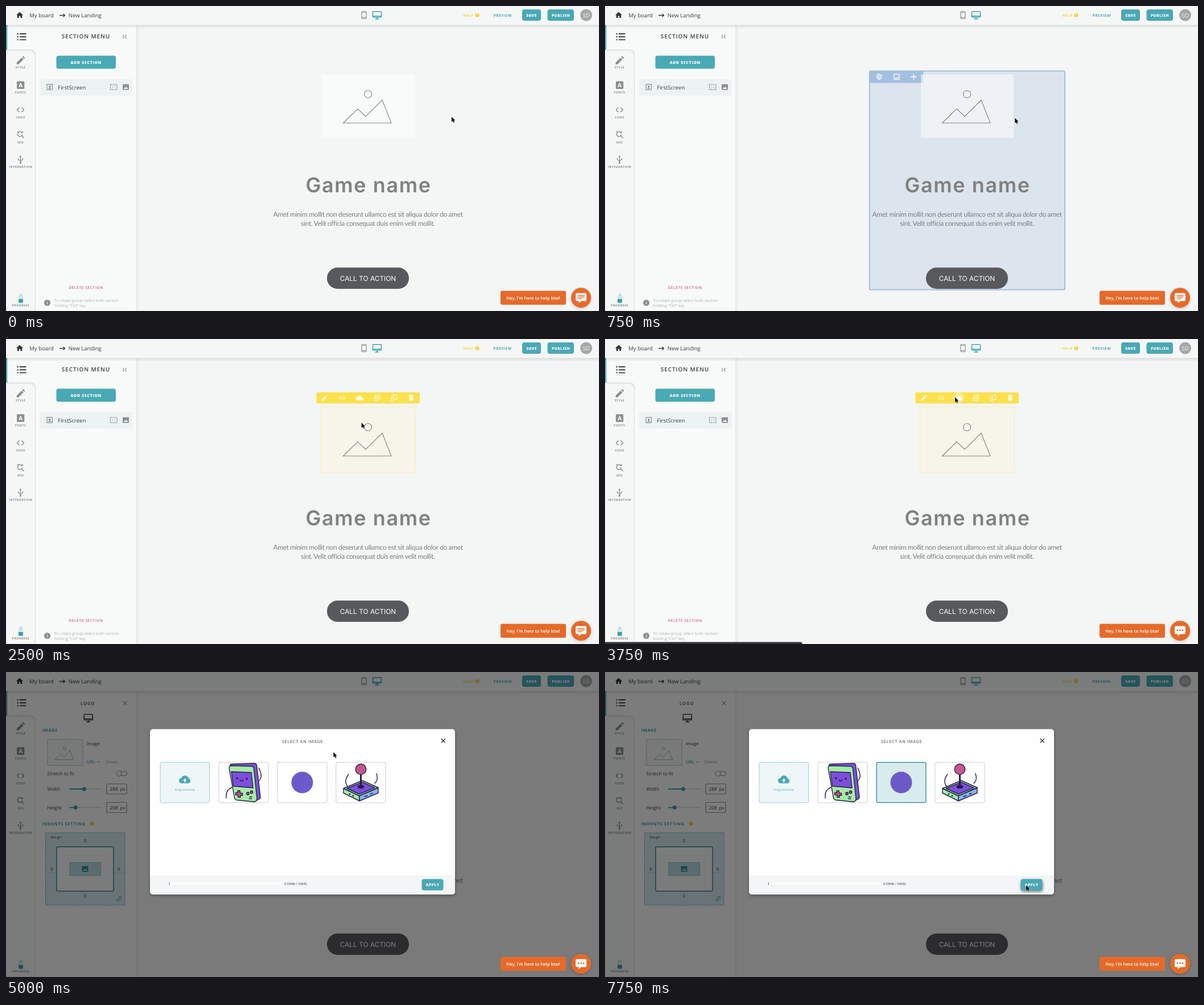
An HTML page for the animation above (8 s loop, 1042 by 537 pixels).

```html
<!DOCTYPE html>
<html lang="en">
<head>
<meta charset="utf-8">
<title>Landing editor</title>
<style>
html, body { margin: 0; width: 100%; height: 100%; overflow: hidden; background: #f4f5f5; }
svg { display: block; }
text { font-family: "Open Sans", sans-serif; font-size: 8px; fill: #3b3e40; text-rendering: geometricPrecision; }
.mid { text-anchor: middle; }
.bold { font-weight: 700; }
.semi { font-weight: 600; }
.white { fill: #fff; }
.teal { fill: #49a9b5; }
.crumb { font-size: 9.6px; font-weight: 500; }
.btn { font-size: 6.6px; font-weight: 800; letter-spacing: .5px; fill: #fff; text-anchor: middle; }
.rail { font-size: 5.4px; font-weight: 700; letter-spacing: .4px; fill: #8b8f90; text-anchor: middle; }
.head { font-size: 7.3px; font-weight: 700; letter-spacing: .8px; fill: #3d9aa6; }
.hint { font-size: 7px; fill: #aeb2b4; }
.field { font-size: 8.3px; }
.para { font: 12px Lato, sans-serif; letter-spacing: -.37px; fill: #7d7f80; text-anchor: middle; }
.line { fill: none; stroke: #8b8f90; stroke-width: 1.2; }
.ink { stroke: #241d46; stroke-width: 1.4; stroke-linejoin: round; stroke-linecap: round; }
.none { fill: none; }
.dash { stroke-width: .9; stroke-dasharray: 2 1.4; }

/* One tick is 250 ms, 3.125% of the loop */
.anim { animation: 8s step-end infinite; }
#hoverSection { animation-name: hoverSection; }
#tile { animation-name: tile; }
#tools { animation-name: tools; }
#toolHover { animation-name: toolHover; }
#status { animation-name: status; }
.before { animation-name: hide; }
.after { animation-name: show; }
#chatLines { animation-name: chatLines; }
#chatDots { animation-name: chatDots; }
#thumbHover { animation-name: thumbHover; }
#thumbPicked { animation-name: thumbPicked; }
#applyHover { animation-name: applyHover; }
#cursor { animation: cursor 8s step-end infinite; }

@keyframes hoverSection {
  0% { opacity: 0 } 3.125% { opacity: .5 } 6.25% { opacity: 1 }
  9.375% { opacity: .4 } 12.5%, 100% { opacity: 0 }
}
@keyframes tile { 0% { opacity: 1 } 12.5%, 100% { opacity: 0 } }
@keyframes tools {
  0% { opacity: 0 } 28.125% { opacity: .5 } 31.25% { opacity: 1 } 50%, 100% { opacity: 0 }
}
@keyframes toolHover { 0% { opacity: 0 } 40.625%, 100% { opacity: 1 } }
@keyframes status { 0% { opacity: 0 } 43.75% { opacity: 1 } 53.125%, 100% { opacity: 0 } }
@keyframes hide { 0% { opacity: 1 } 50%, 100% { opacity: 0 } }
@keyframes show { 0% { opacity: 0 } 50%, 100% { opacity: 1 } }
@keyframes chatLines { 0% { opacity: 1 } 37.5%, 100% { opacity: 0 } }
@keyframes chatDots { 0% { opacity: 0 } 37.5%, 100% { opacity: 1 } }
@keyframes thumbHover {
  0% { opacity: 0 } 65.625% { opacity: .5 } 68.75% { opacity: 1 } 84.375%, 100% { opacity: 0 }
}
@keyframes thumbPicked { 0% { opacity: 0 } 84.375%, 100% { opacity: 1 } }
@keyframes applyHover { 0% { opacity: 0 } 96.875%, 100% { opacity: 1 } }
@keyframes cursor {
  0% { transform: translate(783px, 195px) }
  6.25% { transform: translate(783px, 195px); animation-timing-function: steps(2) }
  12.5% { transform: translate(657.5px, 199.5px); animation-timing-function: steps(2) }
  18.75% { transform: translate(631px, 177px) }
  25% { transform: translate(631px, 177px); animation-timing-function: steps(5) }
  40.625% { transform: translate(615px, 102.5px) }
  56.25% { transform: translate(615px, 102.5px); animation-timing-function: steps(5) }
  71.875% { transform: translate(516px, 199px) }
  75% { transform: translate(514px, 195px) }
  81.25% { transform: translate(514px, 195px); animation-timing-function: steps(2) }
  87.5% { transform: translate(675px, 304px); animation-timing-function: steps(3) }
  96.875%, 100% { transform: translate(740px, 375.5px) }
}
</style>
</head>
<body>
<svg width="1042" height="537" viewBox="0 0 1042 537">
  <defs>
    <linearGradient id="fall" x2="0" y2="1">
      <stop stop-color="#000" stop-opacity=".12"/><stop offset="1" stop-color="#000" stop-opacity="0"/>
    </linearGradient>
    <linearGradient id="side">
      <stop stop-color="#000" stop-opacity=".06"/><stop offset="1" stop-color="#000" stop-opacity="0"/>
    </linearGradient>
    <filter id="soft" x="-30%" y="-50%" width="160%" height="220%"><feGaussianBlur stdDeviation="2.5"/></filter>
    <path id="peaks" d="M592.500 206 618 181 632 194.500 661 165.500 677 206Z"/>
    <path id="pencil" d="M-6.500 6.500v-3.200L2.200-5.400l3.200 3.200L-3.300 6.500ZM3.200-6.400l1.100-1.100q.8-.6 1.500 0l1.700 1.700q.6.7 0 1.500L6.400-3.200Z"/>
    <path id="photo" fill-rule="evenodd" d="M-4.500-5h9q1 0 1 1v8q0 1-1 1h-9q-1 0-1-1v-8q0-1 1-1ZM-4 3.300h8L1.200-.8-.8 1.800-2 .4Z"/>
    <g id="screen" fill="none" stroke-width="1.6">
      <rect x="-7.500" y="-6.500" width="15" height="10" rx="1"/><path d="M-7.500 1.500h15M0 4v2.500M-3.500 6.700h7"/>
    </g>
    <g id="link" fill="none" stroke-width="1.100">
      <path d="M-1-2.300h-1.700a2.300 2.300 0 0 0 0 4.600H-1M1-2.300h1.700a2.300 2.300 0 0 1 0 4.600H1M-2 0h4"/>
    </g>
  </defs>

  <rect width="1042" height="537" fill="#f4f5f5"/>

  <!-- Canvas -->
  <g id="hoverSection" class="anim">
    <rect x="465" y="114.500" width="343" height="385" rx="1.500" fill="#2f70bf" fill-opacity=".3" stroke="#2c6dbd" stroke-width="2"/>
    <path d="M464 114h95v21.500h-95Z" fill="#2f70bf"/>
    <g fill="none" stroke="#fff" stroke-width="1.300">
      <path d="M480.800 119.800h2l.5 1.500 1.500-.3 1.300 1.900-1 1.500 1 1.500-1.300 1.900-1.500-.3-.5 1.500h-2l-.5-1.500-1.500.3-1.300-1.900 1-1.500-1-1.500 1.300-1.900 1.500.3Z"/>
      <circle cx="481.800" cy="124.500" r="1.600"/>
      <rect x="507.500" y="120" width="9.500" height="9.500" rx="1"/>
      <path d="m509 127.500 2-2.500 1.500 1.500 1.500-2 2 3Z" fill="#fff" stroke="none"/>
      <path d="M537.500 124.700h10M542.500 119.700v10" stroke-width="1.700"/>
    </g>
  </g>
  <rect id="tile" class="anim" x="555" y="121" width="163" height="111" fill="#fff" fill-opacity=".52"/>
  <g id="tools" class="anim">
    <rect x="553.500" y="119.500" width="165.500" height="115.500" fill="#fbf6d8" fill-opacity=".35" stroke="#f8f2c4" stroke-width="1.600"/>
    <rect x="545.500" y="94" width="181.500" height="19.500" rx="1.500" fill="#fbe14b"/>
    <circle id="toolHover" class="anim" cx="621.500" cy="103.500" r="9.500" fill="#fff" fill-opacity=".35"/>
    <g fill="#fffbe4" stroke="none">
      <use href="#pencil" transform="translate(560 104) scale(.78)"/>
      <path d="M617.500 108a3 3 0 0 1 0-6 4 4 0 0 1 7.500 1 2.500 2.500 0 0 1 .5 5Z"/>
      <path d="M708.500 100.800h7v7q0 1.200-1.200 1.200h-4.600q-1.200 0-1.200-1.200ZM707.500 98.500h2.500l.7-.8h2.600l.7.8h2.500v1.400h-9Z"/>
    </g>
    <g fill="none" stroke="#fffbe4" stroke-width="1.200">
      <use href="#link" transform="translate(590.500 103.500)"/>
      <path d="M649.500 98.500h7v7h-7ZM647 101v7.500h7.500M653 100.300v3.400M651.300 102h3.400"/>
      <path d="M680.500 98.500h6v8h-6ZM677.500 101v8h6"/>
    </g>
  </g>
  <g fill="none" stroke="#818384" stroke-width="1.100">
    <use href="#peaks"/><circle cx="636.200" cy="155.300" r="6.500"/>
  </g>
  <text x="637" y="328" class="mid" style="font:600 36px Inter,sans-serif;letter-spacing:1.600px;fill:#808182">Game name</text>
  <text x="636" y="371.300" class="para">Amet minim mollit non deserunt ullamco est sit aliqua dolor do amet</text>
  <text x="636" y="386.800" class="para">sint. Velit officia consequat duis enim velit mollit.</text>
  <rect x="564" y="460.500" width="144" height="37.500" rx="18.500" fill="#58595d"/>
  <text x="636" y="483.500" class="mid white" style="font:11.900px Inter,sans-serif;fill:#fff">CALL TO ACTION</text>

  <!-- Side panel -->
  <rect x="229" y="33" width="5" height="504" fill="url(#side)"/>
  <rect y="33" width="229" height="504" fill="#f8f9f9"/>
  <path d="M0 77h43q8.500 0 8.500 8.500V537H0Z" fill="#f5f7f7" stroke="#d9dcdd"/>
  <path d="M0 77h43q8.500 0 8.500 8.500V90q-2-11-10-11H0Z" fill="#e3e6e6"/>
  <path d="M0 33h2.300v44H0Z" class="teal"/>
  <path d="M19.500 49h2.500M19.500 54.200h2.500M19.500 59.400h2.500M24 49h11.500M24 54.200h11.500M24 59.400h11.500" stroke="#3b3e40" stroke-width="1.900"/>

  <g fill="#8b8f90">
    <use href="#pencil" transform="translate(25.300 96.300)"/>
    <rect x="19" y="132.500" width="13.300" height="13.500" rx="1.500"/>
    <path d="m25.300 270.800 0-5.300M25.300 263l2 3h-4Z"/>
  </g>
  <text x="25.600" y="143" class="mid bold white" style="font-size:10px">A</text>
  <path class="line" style="stroke-width:1.500" d="m23.500 178.500-4 4.300 4 4.300M27.500 178.500l4 4.300-4 4.300"/>
  <path class="line" style="stroke-width:1.500" d="M27.500 222.500a4.200 4.200 0 1 0 1.200 3.500M27.500 228.500l4.300 4.200M21 222v-2M29 220.500v2.500h-2.500"/>
  <path class="line" style="stroke-width:1.300" d="M25.500 265v11M21.500 268v2.500l4 2.500 4-2.500v-2.500"/>
  <circle cx="25.500" cy="276" r="1.700" fill="#8b8f90"/>
  <rect x="22" y="509" width="8" height="13.500" rx="1" fill="#cfe6e9"/><path d="M24 506.500h4v3h-4Z" fill="#b9dbe0"/>
  <path d="M22 516h8v5.500q0 1-1 1h-6q-1 0-1-1Z" fill="#3a9fac"/>
  <g>
    <text x="25.500" y="110" class="rail">STYLE</text>
    <text x="25.500" y="154" class="rail">FONTS</text>
    <text x="25.500" y="198" class="rail">CODE</text>
    <text x="25.500" y="241.500" class="rail">SEO</text>
    <text x="25.700" y="285" class="rail">INTEGRATION</text>
    <text x="25.800" y="529" class="rail">PROGRESS</text>
  </g>

  <g class="anim before">
    <text x="140.500" y="57" class="mid semi" style="font-size:10px;letter-spacing:.9px">SECTION MENU</text>
    <path class="line" d="M206 50.500v7M212 50.800l-3.200 3.300 3.200 3.300"/>
    <rect x="88.500" y="87.500" width="104.500" height="23" rx="4" class="teal"/>
    <text x="140.800" y="101.500" class="btn" style="font-size:6.900px;letter-spacing:.7px">ADD SECTION</text>
    <rect x="60" y="129" width="162" height="28.500" fill="#edf2f3"/>
    <rect x="72" y="138" width="9.500" height="9.500" class="line"/>
    <path d="M74.300 145.500q0-1.800 2.500-1.800t2.500 1.800Z" fill="#6d7172"/><circle cx="76.800" cy="141.700" r="1.400" fill="#6d7172"/>
    <text x="91.300" y="146.500" style="font-size:9.500px">FirstScreen</text>
    <rect x="183.500" y="138" width="11.500" height="9.500" class="line" stroke-dasharray="3 1"/>
    <path class="line" style="stroke-width:.8" d="m186 140 2 1.800m2.500 0 2-1.800m-6.500 5.500 2-1.800m2.500 0 2 1.800"/>
    <use href="#photo" x="210.500" y="142.700" fill="#8b8f90"/>
    <text x="140.700" y="497.500" class="mid semi" style="font-size:6.300px;letter-spacing:.75px;fill:#cc5c7b">DELETE SECTION</text>
    <circle cx="72.500" cy="522.500" r="5.500" fill="#8b8f90"/>
    <path d="M72.500 522v3.200M72.500 519.300v1.300" stroke="#fff" stroke-width="1.200"/>
    <text x="84.500" y="520.500" class="hint">To create group select both section</text>
    <text x="84.500" y="529.500" class="hint">holding “Ctrl” key</text>
  </g>

  <g class="anim after">
    <text x="143.800" y="58" class="mid semi" style="font-size:7.600px;letter-spacing:1px">LOGO</text>
    <path class="line" d="m205.500 51.300 7 7m0-7-7 7"/>
    <use href="#screen" x="144.700" y="81" stroke="#3b3e40"/>
    <text x="63.500" y="105.200" class="head">IMAGE</text>
    <rect x="73" y="119" width="62" height="45.500" class="dash" fill="#f1f3f3" stroke="#8b8f90"/>
    <g class="line" style="stroke-width:2" transform="translate(-142 61.500) scale(.385)"><use href="#peaks" y="35"/><circle cx="636" cy="190" r="6.500"/></g>
    <text x="142" y="129" style="font-size:8px">Image</text>
    <text x="142" y="161" class="semi" style="font-size:7.600px;fill:#3d9aa6">URL</text>
    <path d="m160.500 157.300 2 2 2-2" fill="none" stroke="#3d9aa6"/>
    <text x="174" y="161" style="font-size:7.600px;fill:#999d9e">Delete</text>
    <text x="72.500" y="181.500" class="field">Stretch to fit</text>
    <rect x="195" y="175" width="17.500" height="7.500" rx="3.700" class="line"/>
    <circle cx="198.500" cy="178.700" r="4.700" fill="#f8f9f9" stroke="#8b8f90"/>
    <text x="72.500" y="209" class="field">Width</text>
    <text x="72.500" y="241.500" class="field">Height</text>
    <path d="M111 206h57M111 238.600h57" stroke="#d0d4d5" stroke-width="1.500"/>
    <path d="M111 206h26M111 238.600h11" stroke="#3d9aa6" stroke-width="1.800"/>
    <circle cx="137.300" cy="206" r="3.600" fill="#3d9aa6"/><circle cx="122.300" cy="238.600" r="3.600" fill="#3d9aa6"/>
    <rect x="177" y="197" width="35" height="18" rx="1.500" class="line"/><rect x="177" y="229.500" width="35" height="18" rx="1.500" class="line"/>
    <text x="182.500" y="209" class="field">288</text><text x="200.500" y="209">px</text>
    <text x="182.500" y="241.500" class="field">208</text><text x="200.500" y="241.500">px</text>
    <text x="63.500" y="269.500" class="head">INDENTS SETTING</text>
    <circle cx="151.300" cy="266.700" r="3.500" fill="#f0c62e"/><path d="M151.300 266.300v2.300M151.300 264.600v.9" stroke="#fff" stroke-width=".9"/>
    <rect x="69.500" y="283" width="139.500" height="127.500" class="dash" fill="#d3e7ea" stroke="#3d9aa6"/>
    <path d="M69.500 353.500h19M189.500 353.500h19.500" class="dash" stroke="#9cc9d0"/>
    <rect x="89" y="307.700" width="100" height="78" rx="2" fill="#f4f7f7" stroke="#3e7f92" stroke-width="1.500"/>
    <rect x="112" y="335.300" width="54.500" height="23" class="dash" fill="#b7d9de" stroke="#3d9aa6"/>
    <use href="#photo" x="139" y="346.800" fill="#32869a"/>
    <text x="78.500" y="292.500" style="font-size:5.900px">Margin</text>
    <text x="139" y="300" class="mid">0</text><text x="139" y="396.500" class="mid">0</text>
    <text x="80.500" y="349.700" class="mid">0</text><text x="198" y="349.700" class="mid">0</text>
    <use href="#link" transform="translate(198.700 399.300) rotate(-45) scale(.9)" stroke="#3d9aa6"/>
  </g>

  <!-- Top bar -->
  <rect y="33" width="1042" height="6" fill="url(#fall)"/>
  <rect width="1042" height="33.500" fill="#f5f7f7"/>
  <path d="M24 10.500 18 16h1.800v5h3v-3.500h2.500V21h3v-5H30Z" fill="#333637"/>
  <text x="41.200" y="19.500" class="crumb">My board</text>
  <path d="M94 16.500h9M100.500 13.700l3 2.800-3 2.800" fill="none" stroke="#333637" stroke-width="1.300"/>
  <text x="109.800" y="19.500" class="crumb">New Landing</text>
  <rect x="625" y="9.500" width="8" height="13" rx="1.300" class="line"/><path d="M625 11.500h8M625 20.300h8" class="line"/>
  <use href="#screen" x="652" y="16.300" stroke="#3fa7b4"/>
  <text x="803.500" y="18.600" class="bold" style="font-size:6.400px;letter-spacing:.5px;fill:#f3d33f">HELP</text>
  <circle cx="828" cy="16" r="3.600" fill="#f5d02f"/><text x="828" y="18.200" class="mid bold white" style="font-size:6px;fill:#fff">?</text>
  <text x="872.700" y="18.500" class="btn" style="fill:#49a9b5;font-weight:700">PREVIEW</text>
  <rect x="907" y="6" width="33" height="20" rx="4" class="teal"/><text x="923.500" y="18.500" class="btn">SAVE</text>
  <rect x="951.500" y="6" width="46.500" height="20" rx="4" class="teal"/><text x="975" y="18.500" class="btn">PUBLISH</text>
  <circle cx="1019.500" cy="16" r="10.500" fill="#a5a7a8"/><text x="1019.500" y="19.500" class="mid" style="font-size:9.500px;fill:#f5f5f5">SD</text>

  <path id="status" class="anim" d="M0 533.500h343.500q3 0 3 3.500H0Z" fill="#35363a"/>

  <!-- Image picker -->
  <g class="anim after">
    <rect width="1042" height="537" fill-opacity=".5"/>
    <rect x="253" y="102" width="536" height="292" rx="5" fill-opacity=".35" filter="url(#soft)"/>
    <rect x="253" y="100.500" width="536" height="291" rx="5" fill="#fefefe"/>
    <path d="M253 358h536v28.500q0 5-5 5H258q-5 0-5-5Z" fill="#f4f5f6"/>
    <text x="521.200" y="125" class="mid" style="font-size:7.300px;letter-spacing:.75px">SELECT AN IMAGE</text>
    <path d="m764.800 117.600 7 7m0-7-7 7" stroke="#333637" stroke-width="1.400"/>
    <rect x="271" y="159" width="86.500" height="71" rx="2" class="dash" fill="#eff6f7" stroke="#49a9b5"/>
    <path d="M309 196a4.800 4.800 0 0 1-.5-9.600 6.600 6.600 0 0 1 12.500 1 4.500 4.500 0 0 1-.3 8.600Z" class="teal"/>
    <path d="M314.300 187.500l3.500 3.700h-2.300v3h-2.400v-3h-2.300Z" fill="#fff"/>
    <text x="314.300" y="208.700" class="mid" style="font-size:5.200px;fill:#49a9b5">Drag and drop</text>
    <g class="dash" fill="#fff" stroke="#9fa4a8">
      <rect x="374" y="159" width="87" height="71" rx="2"/>
      <rect x="477" y="159" width="87" height="71" rx="2"/>
      <rect x="580" y="159" width="87" height="71" rx="2"/>
    </g>

    <!-- Handheld console -->
    <g class="ink">
      <path class="none" d="M397 203q-11 5-10 16v3M441 194q9-5 7-14t-4-11"/>
      <path d="M394 164q0-2 3-2l39-1q4 0 4.500 3l6.500 56q0 3-3 4l-8 5Z" fill="#7a56d8"/>
      <path d="M392 169q0-4 4-4l35 1q4 0 4.500 4l5.500 53q0 5-5 5.500l-30-3q-4-.5-4.500-4Z" fill="#a5eba6"/>
      <path d="M396 175.500 431 177l3 27-34.500-3Z" fill="#7c4fdb"/>
      <path class="none" d="M411 190q3 4 6 0M428 220l4 .3M427.500 223l4 .3"/>
      <circle cx="406" cy="187" r="1"/><circle cx="423" cy="188" r="1"/>
      <path d="M407 209h4l.4 4 4 .4.3 4-4-.2.3 3.500-4-.4-.3-3.500-4-.4v-4l3.600.3Z" fill="#cc4f86"/>
      <circle cx="425" cy="214" r="2.200" fill="#cc4f86"/><circle cx="431.500" cy="211.500" r="2.200" fill="#cc4f86"/>
    </g>

    <!-- Joystick -->
    <g class="ink">
      <path class="none" d="M600 201q-7-9 2-21M648 196q7-6 3-17"/>
      <path d="M593 205v8l28 14v-9Z" fill="#a5eba6"/>
      <path d="M621 218v9l33-14v-9Z" fill="#86b4f0"/>
      <path d="M593 205 626 191l28 12.500L621 218Z" fill="#a5eba6"/>
      <path d="M599 205 626 194l22 9.700L621 215Z" fill="#7c4fdb"/>
      <ellipse cx="623.500" cy="202" rx="5" ry="2.500" fill="#241d46"/>
      <path d="M623.500 180v21" style="stroke-width:3"/>
      <circle cx="623.500" cy="171.300" r="9.300" fill="#c5568f"/>
      <circle cx="604" cy="215" r=".7"/><circle cx="610" cy="218" r=".7"/>
      <path class="none" d="M630 219.500l5-2M640 215l4-1.700"/>
    </g>

    <rect id="thumbPicked" class="anim" x="477.300" y="159.300" width="86.500" height="70.500" rx="2" fill="#d8ecee" stroke="#4d9aa8" stroke-width="1.500"/>
    <circle cx="520.500" cy="194.500" r="19" fill="#6c5acb"/>
    <g id="thumbHover" class="anim">
      <rect x="477.300" y="159.300" width="86.500" height="70.500" rx="2" fill="#5d6165" fill-opacity=".93" stroke="#4d9aa8" stroke-width="1.500"/>
      <g fill="none" stroke-width="1.300">
        <circle cx="508" cy="193.500" r="8.500" stroke="#4598a6"/>
        <path d="M505.500 189.500v6.500h6.500M503.500 191.500h6.500v6.500" stroke="#4598a6"/>
        <circle cx="533.700" cy="193.500" r="8.500" stroke="#d9a72f"/>
        <path d="M528.700 193.500q5-6 10 0-5 6-10 0Z" stroke="#d9a72f"/>
        <circle cx="533.700" cy="193.500" r="1.500" fill="#d9a72f" stroke="none"/>
      </g>
    </g>

    <rect x="287" y="371" width="198" height="3.500" rx="1" fill="#fff"/>
    <path d="M287.300 370.700v4" stroke="#55595c"/>
    <text x="488.700" y="374.800" style="font-size:5.700px">0.03Mb / 50Mb</text>
    <rect id="applyHover" class="anim" x="731" y="367" width="38" height="20" rx="4" fill-opacity=".5" filter="url(#soft)"/>
    <rect x="730.500" y="364.500" width="38" height="20" rx="4" class="teal"/>
    <text x="749.700" y="377" class="btn" style="letter-spacing:.6px">APPLY</text>
  </g>

  <!-- Chat -->
  <rect x="869" y="501.500" width="115" height="24.500" rx="3" fill="#e56a29"/>
  <text x="926.500" y="516.500" class="mid semi" style="font-size:7.700px;fill:#fff">Hey, I'm here to help btw!</text>
  <circle cx="1010.500" cy="515" r="17.500" fill-opacity=".22" filter="url(#soft)"/>
  <circle cx="1010.500" cy="513.700" r="17.500" fill="#e56a29"/>
  <path d="M1003 505.500h15q2 0 2 2v10q0 2-2 2h-7l-4.500 3.500v-3.500h-3.500q-2 0-2-2v-10q0-2 2-2Z" fill="#fff"/>
  <path id="chatLines" class="anim" d="M1004.500 510h12M1004.500 512.700h12M1004.500 515.400h8" stroke="#e56a29" stroke-width="1.300"/>
  <g id="chatDots" class="anim" fill="#e56a29">
    <circle cx="1006" cy="512.700" r="1.500"/><circle cx="1010.500" cy="512.700" r="1.500"/><circle cx="1015" cy="512.700" r="1.500"/>
  </g>

  <path id="cursor" d="M0 0v9l2-1.800 1.500 3.300 1.500-.7L3.600 6.600h2.800Z" stroke="#fff" stroke-width=".8" paint-order="stroke"/>
</svg>
</body>
</html>
```
